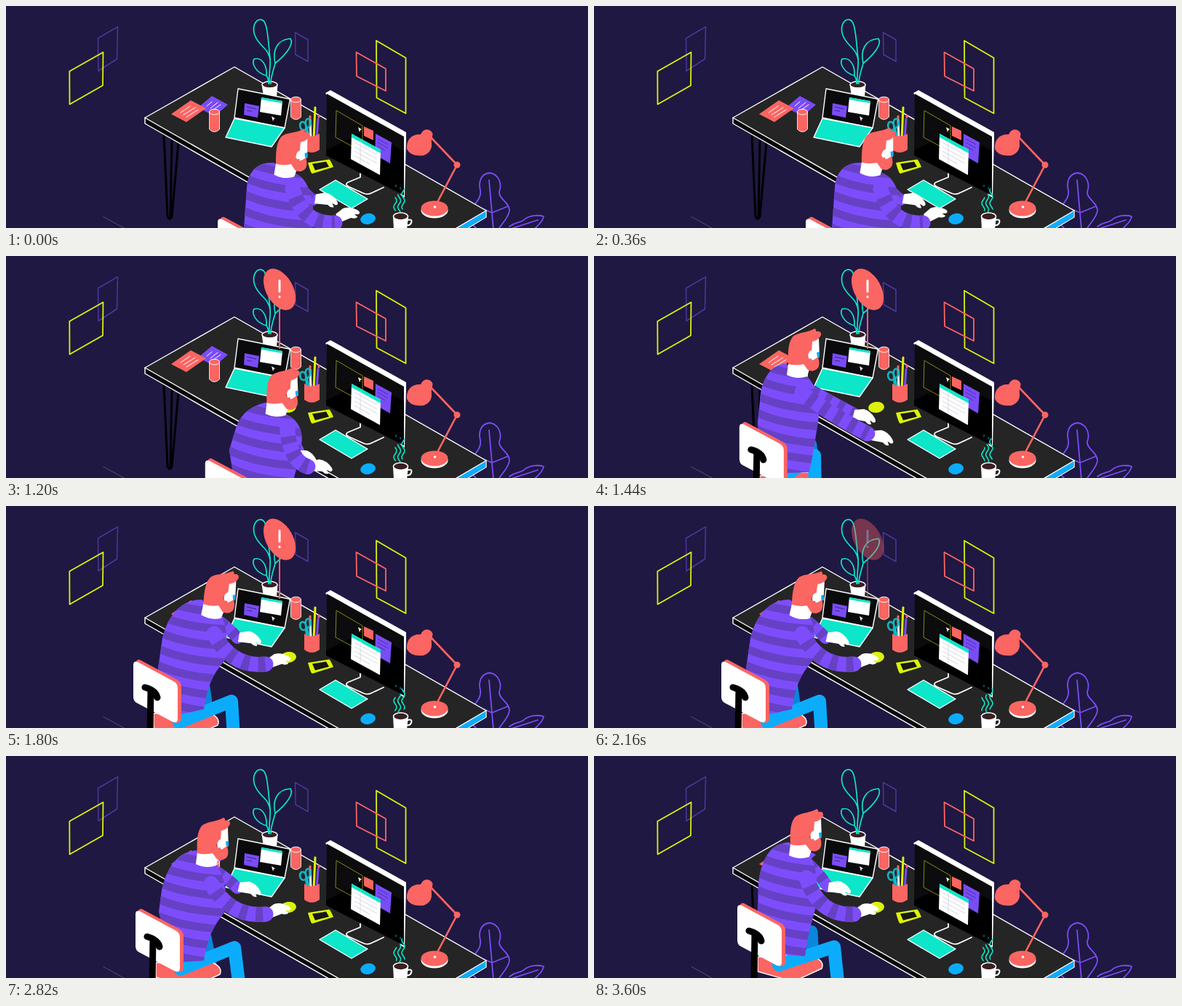
Recreate the animation shown at these times as an HTML page. Size 800 by 306 pixels, loop 3630 ms.

```html
<!DOCTYPE html>
<html lang="en">
<head>
<meta charset="utf-8">
<title>Two desks' worth of work</title>
<style>
  html, body { margin: 0; width: 100%; height: 100%; overflow: hidden; background: #1f1842; }
  svg { display: block; width: 800px; height: 306px; }
  .coral { fill: #fb6562; } .teal { fill: #0de6c8; } .violet { fill: #7a4cf5; }
  .white { fill: #fff; } .blue { fill: #0cacfc; } .lime { fill: #dcf30a; }
  .line { fill: none; stroke-linecap: round; stroke-linejoin: round; }
  .rim { stroke: #fff; stroke-width: 1.4; stroke-linejoin: round; }
  .light { stroke: #7d4dfc; } .dark { stroke: #6641c4; stroke-linecap: butt; }
</style>
</head>
<body>
<svg viewBox="0 0 800 306">
  <defs>
    <clipPath id="torsoClip"><use href="#torso"/></clipPath>
    <path id="torso"/><path id="nearArm"/><path id="farArm"/>
    <path id="hand" d="M-4-6L8-10Q18-10 26-1Q30 4 25 5L20 3L23 8Q19 10 14 6L-4 7Z"/>
    <g id="can">
      <path class="coral" d="M-7-12V12Q0 19 7 12V-12Z" stroke="#fff" stroke-width=".8"/>
      <ellipse class="coral" cy="-12" rx="7" ry="3.8" stroke="#fff"/>
    </g>
    <path id="cursor" class="white" d="M0 0L5 3L3 4L2 7Z"/>
  </defs>

  <!-- wall -->
  <g class="line" stroke-width="1.8">
    <path stroke="#4e369c" stroke-width="1.5" d="M126.500 44.500L153.500 28.700L152.500 73L127 89.500ZM397.500 36.500L415 46.500V76.500L398 67Z"/>
    <path stroke="#dcf30a" d="M87.300 90L133.500 63.700L133 109.500L87.500 135.500ZM509 47.700L549.500 71.500V148L509.500 126.500Z"/>
    <path stroke="#fb6562" d="M481.500 63.700L522 86.500V117L482 96.700Z"/>
    <path stroke="#48415f" stroke-width="1.3" d="M134 290.500L164 307"/>
  </g>

  <!-- floor plant -->
  <g class="line" stroke="#7a4cf5" stroke-width="1.8">
    <path d="M646 306C634 296 637 284 644 274C650 266 653 262 652 254C649 242 653 231 665 230C678 232 682 246 678 256C677 266 692 270 692 282C691 292 681 300 677 308"/>
    <path d="M664 240L670 308M648 276L668 285L690 276"/>
    <path d="M692 304C702 296 708 300 714 293C722 288 733 288 739 290C738 298 730 303 726 308M694 307L731 295"/>
  </g>

  <!-- desk -->
  <path class="line" stroke="#000" stroke-width="3" d="M217 177L222 290Q225 297 228 290L237 188M228 183L226 292"/>
  <path class="rim" fill="#08080a" d="M191 154V162L458 315L620 315L660 291V282Z"/>
  <path class="blue" d="M659 283V291L620 314H606Z"/>
  <path class="rim" fill="#252525" d="M191 154L314 84L660 282L604 315H472Z"/>

  <!-- papers and cans -->
  <path class="violet" d="M264 140L283 124L305 136L287 152Z"/>
  <path class="coral" d="M227 149L254 130L275 141L248 160Z"/>
  <path class="line" stroke="#fff" d="M276 138L283 132M281 141L291 133M285 143L295 136M240 147L253 138M244 150L260 140M248 153L264 143"/>
  <use href="#can" x="286.500" y="158"/>
  <use href="#can" x="398.500" y="141"/>

  <!-- potted plant -->
  <path class="white" d="M351.500 108L354 125Q363 130 372 125L373.500 108Z"/>
  <ellipse cx="362.500" cy="108.500" rx="10.500" ry="4.500" fill="#3a2022" stroke="#fff" stroke-width="1.300"/>
  <g class="line" stroke="#0de6c8" stroke-width="1.700">
    <path d="M362 107C361 92 364 84 363 72C361 58 361 40 357 26C354 16 345 16 341 27C338 40 347 50 355 58C360 63 362 68 363 74"/>
    <path d="M364 107C364 96 368 88 370 79C366 62 372 46 391 45C396 52 386 66 370 79"/>
    <path d="M361 107C361 101 360 99 358 96C344 92 337 80 341 73C352 70 359 82 358 96"/>
  </g>

  <!-- laptop -->
  <path class="rim" fill="#0a0a0c" d="M319 114L389 128Q391 129 390 131L383 168L314 154Z"/>
  <path class="teal rim" d="M314 155L383 168L365 194L302 181Z"/>
  <path class="violet" d="M328 134L348 138L346 154L327 150Z"/>
  <path stroke="#3c2785" fill="none" d="M331 139L344 142M331 144L338 145"/>
  <path class="white" d="M351 126L380 131L378 151L349 146Z"/>
  <path class="teal" d="M351 126L380 131L380 134L351 129Z"/>
  <use href="#cursor" x="365" y="152"/>

  <!-- alert -->
  <g id="alert">
    <path id="stick" class="line" stroke="#fb6562" stroke-width="2"/>
    <g id="disc">
      <ellipse class="coral" rx="18.500" ry="31" transform="rotate(-29)"/>
      <path class="line" stroke="#fff" stroke-width="3" d="M0-12V3M0 10V10.500"/>
    </g>
  </g>

  <!-- pencil cup -->
  <g class="line" stroke-width="3">
    <path stroke="#dcf30a" d="M425 140L423 184"/>
    <path stroke="#7a4cf5" d="M429 156L427 184"/>
    <path stroke="#fff" d="M418 157L419 184"/>
    <path stroke="#fb6562" d="M418 152V155M430 151V153"/>
    <path stroke="#0db8c8" stroke-width="2.500" d="M414 182L412 170C405 174 402 164 406 160C412 158 413 166 412 170M417 182L414 169C410 160 412 154 417 156C420 162 418 166 414 169"/>
  </g>
  <path class="coral" d="M410 176Q420 183 431 176V198Q420 206 410 198Z"/>

  <!-- phone and laptop mouse -->
  <path class="lime" d="M415 216L444 211.500Q446 212 450 222L421 231Q419 231 415 216Z"/>
  <path fill="#17171a" d="M421 217.500L440 214.500L444 221.500L425 226.500Z"/>
  <ellipse class="lime" cx="388" cy="208.500" rx="11" ry="7.500" transform="rotate(-8 388 208)"/>

  <!-- monitor -->
  <path class="line" stroke="#fff" stroke-width="1.800" d="M487 231V236L470 243Q465 246 471 249L491 258Q498 261 504 257L519 250"/>
  <path class="white" d="M439 120L446 116L550 174V181L548 264L544 262Z"/>
  <path fill="#0c0c0e" d="M441 121L547 180V261L440 206Z"/>
  <path d="M440 199L494 172L547 200V261L440 206Z"/>
  <path fill="none" stroke="#85880f" d="M454 144L490 165V201L453 181Z"/>
  <path class="coral" d="M492 166L505 172V185L492 179Z"/>
  <path class="violet" d="M508 176L530 188L528 217L507 205Z"/>
  <path stroke="#4b2fa8" fill="none" d="M511 183L525 191M511 188L525 196M511 193L521 199"/>
  <path class="white" d="M475 176L515 198L514 233L474 211Z"/>
  <path class="teal" d="M475 176L515 198V203L475 181Z"/>
  <path stroke="#d4d7df" fill="none" d="M479 188L510 205M479 194L510 211M479 200L510 217M479 206L500 218M487 186V216"/>
  <use href="#cursor" x="484" y="167"/>
  <path class="line" stroke="#0cacfc" d="M536 247V249M542 250V252"/>

  <!-- keyboard, mouse, coffee -->
  <path class="teal rim" d="M431 253L453 240L497 266L475 279Z"/>
  <ellipse class="blue" cx="497.500" cy="293.500" rx="10.500" ry="7.500" transform="rotate(-12 497 293)"/>
  <path class="line" stroke="#fff" stroke-width="2" d="M552 295Q559 293 557 299Q555 303 551 302"/>
  <path class="white" d="M532 290L533 308H551L553 290Z"/>
  <ellipse cx="542.500" cy="290" rx="10" ry="5" fill="#3a2022" stroke="#fff" stroke-width="1.500"/>
  <path id="steam" class="line" stroke="#0de6c8" stroke-width="1.600"/>

  <!-- lamp -->
  <ellipse class="white" cx="589" cy="281.500" rx="18.500" ry="11"/>
  <ellipse class="coral" cx="589" cy="279" rx="18.500" ry="10.500"/>
  <path class="line" stroke="#fb6562" stroke-width="2.600" d="M590 276L620 219L583 180"/>
  <circle class="white" cx="589.500" cy="277" r="1.800"/>
  <circle class="coral" cx="620" cy="219" r="4.500"/>
  <path class="coral" d="M551 197C550 184 558 176 570 177Q574 168 582 171Q588 174 586 180Q584 185 585 190Q586 201 574 206Q556 208 551 197Z"/>

  <!-- worker -->
  <path id="farLeg" class="line" stroke="#0a86da" stroke-width="17"/>
  <path id="seat" class="coral rim" d="M203 286L268 281Q297 289 291 302L252 320L203 306Z"/>
  <path id="nearLeg" class="line" stroke="#0cacfc" stroke-width="18"/>
  <use href="#farArm" class="line light" stroke-width="16"/>
  <use href="#farArm" class="line dark" stroke-width="16" stroke-dasharray="9 11"/>
  <g id="farHand"><use href="#hand" class="white typing"/></g>
  <use href="#torso" fill="#7d4dfc"/>
  <g clip-path="url(#torsoClip)"><g id="stripes" class="line dark" stroke-width="11"></g></g>
  <g id="nearHand"><use href="#hand" class="white typing"/></g>
  <use href="#nearArm" class="line light" stroke-width="21"/>
  <use href="#nearArm" class="line dark" stroke-width="21" stroke-dasharray="10 12" stroke-dashoffset="-12"/>
  <g id="head">
    <path class="white" d="M271 114L268 137Q282 144 296 139L300 126L290 112Z"/>
    <path class="white" d="M299 92L312 86L313 112L302 118Z"/>
    <path class="blue" d="M309 106L313 105V112L310 113Z"/>
    <path class="coral" d="M296 112L304 117L311 112Q314 122 311 127Q305 134 297 130L291 122Z"/>
    <path class="coral" d="M270 122C269 102 271 92 275 86C280 78 297 79 306 73Q309 74 308 77Q316 76 315 82Q312 89 303 91L302 106L297 109L295 121Q281 125 270 122Z"/>
    <ellipse class="white" cx="301" cy="109" rx="3.500" ry="6" transform="rotate(15 301 109)"/>
  </g>
  <g id="chair">
    <path class="coral" d="M184 212Q180 211 178 216V264Q178 269 183 272L231 298Q241 301 241 292V250Q241 243 236 240Z"/>
    <path class="white" d="M181 215Q175 213 175 219V263Q175 268 179 271L228 297Q236 301 236 293V251Q236 245 231 242Z"/>
    <path class="line" stroke="#000" stroke-width="9" d="M191 250Q206 254 208 264M199 254L198 316"/>
  </g>
</svg>

<script>
const LOOP = 3630, $ = id => document.getElementById(id);
const NUM = /-?\d+(\.\d+)?/g;
const smooth = k => k * k * (3 - 2 * k);
const speedUp = k => k ** 1.6;
const slowDown = k => 1 - (1 - k) ** 2;

// Poses: typing, startled, rolling, at laptop, leaning back, upright
const schedule = [
  [0, 0], [600, 0, smooth], [840, 1], [1070, 1, speedUp], [1440, 2, slowDown],
  [1740, 3], [2160, 3, smooth], [2600, 4], [2820, 4, smooth], [3240, 5], [LOOP, 5]
];

const parts = {
  torso: ['d',
    'M368 216C345 215 333 228 331 250L327 306L330 320L420 320C422 300 424 280 420 265C416 248 410 236 398 231Z',
    'M380 214C358 220 342 230 336 250L326 276L334 320L418 312C422 300 428 275 430 260C430 245 422 236 408 231Z',
    'M264 149C244 148 232 170 229 190L225 230L232 300L296 298C300 280 303 262 307 235C312 210 310 185 294 167Z',
    'M269 129C244 129 224 146 215 182L209 224L228 290L272 280C276 250 285 230 300 214C305 190 305 168 296 152Z',
    'M262 130C238 132 222 150 214 185L210 215L228 285L272 282C276 255 284 235 300 216C304 190 302 170 290 151Z',
    'M268 119C244 120 230 140 226 176L225 214L234 272L290 276C293 250 300 225 306 205C308 180 306 150 297 138Z'],
  nearArm: ['d',
    'M394 252Q408 302 452 299', 'M410 248Q406 298 424 301', 'M286 188Q320 216 376 245',
    'M286 176Q310 223 357 218', 'M282 176Q308 223 357 218', 'M292 168Q310 221 357 218'],
  farArm: ['d',
    'M400 245Q413 262 422 267', 'M405 250Q412 270 415 286', 'M300 186Q330 203 357 217',
    'M295 160Q308 170 318 182', 'M290 160Q306 170 318 182', 'M296 150Q312 165 321 180'],
  nearLeg: ['d',
    'M370 390L430 360L432 400', 'M370 390L430 360L432 400', 'M250 312L303 275L304 330',
    'M238 298L310 269L313 320', 'M240 294L314 264L321 320', 'M254 288L330 263L336 320'],
  farLeg: ['d',
    'M390 340L400 370', 'M390 340L400 370', 'M298 260L302 300',
    'M272 250L277 286', 'M274 250L281 284', 'M299 242L301 276'],
  head: ['transform',
    'translate(101 96) rotate(2 285 120)', 'translate(110 93) rotate(0 285 120)',
    'translate(-3 27) rotate(0 285 120)', 'translate(2 15) rotate(5 285 120)',
    'translate(-7 12) rotate(0 285 120)', 'translate(0 0) rotate(0 285 120)'],
  nearHand: ['transform',
    'translate(459 291) rotate(-20)', 'translate(430 299) rotate(5)', 'translate(385 248) rotate(14)',
    'translate(364 216) rotate(-17)', 'translate(364 216) rotate(-17)', 'translate(364 216) rotate(-17)'],
  farHand: ['transform',
    'translate(429 266) rotate(8)', 'translate(412 288) rotate(20)', 'translate(361 219) rotate(14)',
    'translate(324 181) rotate(10)', 'translate(324 181) rotate(10)', 'translate(326 181) rotate(10)'],
  stripes: ['transform',
    'translate(118 86)', 'translate(122 86)', 'translate(16 20)',
    'translate(0 0)', 'translate(-2 0)', 'translate(16 -12)'],
  chair: ['transform',
    'translate(116 79)', 'translate(116 79)', 'translate(25 17)',
    'translate(0 0)', 'translate(3 -1)', 'translate(22 -9)']
};
parts.seat = parts.chair;

$('stripes').innerHTML = Array.from({ length: 9 }, (_, i) =>
  `<path d="M198 ${122 + i * 23}q45 25 122 25"/>`).join('');

function mix(a, b, k) {
  const target = b.match(NUM);
  let i = 0;
  return a.replace(NUM, n => +n + (target[i++] - n) * k);
}

const ramp = (t, from, to) => Math.min(1, Math.max(0, (t - from) / (to - from)));

function pose(t) {
  const i = schedule.findIndex((_, n) => t < schedule[n + 1][0]);
  const [start, from, ease = smooth] = schedule[i], [end, to] = schedule[i + 1];
  const k = ease(ramp(t, start, end));
  for (const id in parts) {
    const [attr, ...poses] = parts[id];
    $(id).setAttribute(attr, mix(poses[from], poses[to], k));
  }
}

function typing(t) {
  const level = t < 600 ? 1 - ramp(t, 480, 600) : ramp(t, 1740, 1860);
  const nod = level * (1 - Math.cos(t / LOOP * 10 * Math.PI)) / 2;
  const reach = t < 840 ? 3 : 1;
  const head = $('head');
  head.setAttribute('transform', `translate(${-nod * reach} ${-nod * reach * .7}) ` + head.getAttribute('transform'));
  document.querySelectorAll('.typing').forEach((hand, i) => {
    const still = i && t > 840 ? .3 : 1;
    hand.setAttribute('transform', `rotate(${3.5 * level * still * Math.sin(t / LOOP * 24 * Math.PI + i * 3)})`);
  });
}

function alert(t) {
  const grow = ramp(t, 640, 840), settle = smooth(ramp(t, 900, 1080));
  const scale = 1.16 * slowDown(grow) - .16 * settle;
  const y = 127 - 95 * slowDown(grow) + 14 * settle;
  $('stick').setAttribute('d', `M376 ${y}V127`);
  $('disc').setAttribute('transform', `translate(376 ${y}) scale(${scale})`);
  $('alert').setAttribute('opacity', grow > 0 ? 1 - ramp(t, 2040, 2240) : 0);
}

function steam(t) {
  const phase = t / LOOP * 6 * Math.PI;
  const wisp = (x, bottom, top) => {
    let d = '';
    for (let y = bottom; y >= top; y -= 2) {
      d += `${d ? 'L' : 'M'}${x + 2 * Math.sin(y / 2.8 + phase)} ${y}`;
    }
    return d;
  };
  $('steam').setAttribute('d', wisp(535, 282, 264) + wisp(540.5, 284, 259) + wisp(546, 280, 251));
}

function draw() {
  const t = performance.now() % LOOP;
  pose(t);
  typing(t);
  alert(t);
  steam(t);
  requestAnimationFrame(draw);
}
draw();
</script>
</body>
</html>
```
